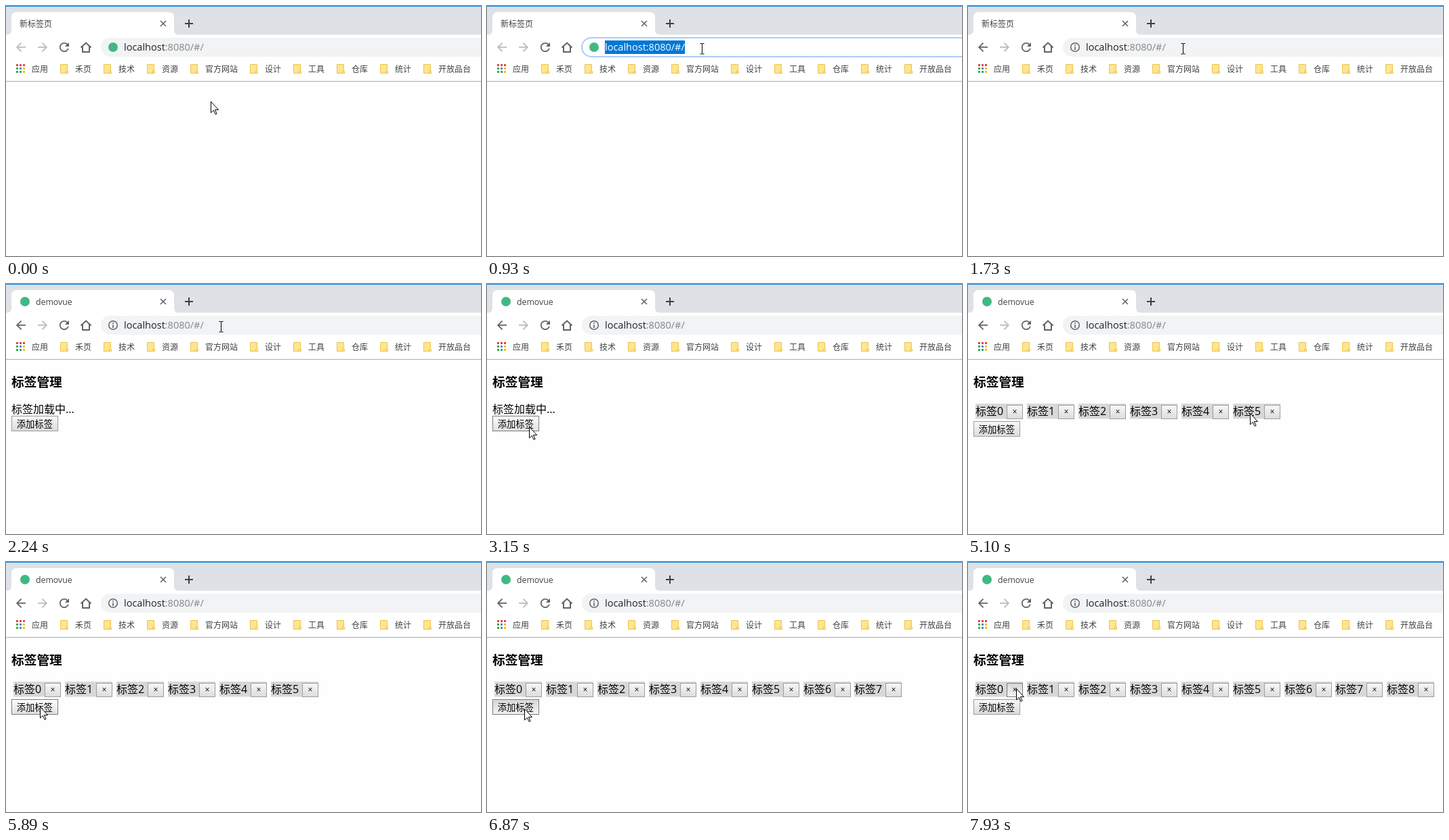
Write an HTML page that moves like this. It is 701 by 370 pixels and loops after 8000 ms.

```html
<!DOCTYPE html>
<html lang="zh-CN">
<head>
<meta charset="utf-8">
<title>demovue</title>
<style>
  html, body { margin: 0; width: 100%; height: 100%; overflow: hidden; background: #fefefe; }
  svg { display: block; }
  text { font-family: "Noto Sans CJK SC", "Noto Sans CJK", sans-serif; fill: #000; white-space: pre; }
  .ui { font-size: 12px; fill: #3c4043; }
  .latin { font-family: "Open Sans", "Noto Sans", sans-serif; }
  .url { font-size: 14.5px; fill: #202124; }
  .icon { fill: #5f6368; }
  .line { fill: none; stroke: #5f6368; stroke-width: 2; }
</style>
</head>
<body>
<svg id="stage" width="701" height="370" viewBox="0 0 701 370">
  <defs>
    <linearGradient id="face" x2="0" y2="1">
      <stop offset=".1" stop-color="#f5f5f5"/><stop offset="1" stop-color="#dcdcdc"/>
    </linearGradient>
    <linearGradient id="hover" x2="0" y2="1">
      <stop offset=".1" stop-color="#fafafa"/><stop offset="1" stop-color="#e0e0e0"/>
    </linearGradient>
    <linearGradient id="down" x2="0" y2="1">
      <stop offset="0" stop-color="#d6d6d6"/><stop offset="1" stop-color="#f4f4f4"/>
    </linearGradient>
  </defs>

  <rect width="701" height="370" fill="#fefefe"/>
  <rect width="701" height="43" fill="#dee1e6"/>
  <rect width="701" height="1" fill="#1883d7"/>
  <path d="M0 43q8 0 8-8V17q0-8 8-8H240q8 0 8 8V35q0 8 8 8Z" fill="#fff"/>
  <rect y="42.5" width="701" height="69" fill="#fff"/>
  <rect y="111" width="701" height="1" fill="#aeaeae"/>
  <path d="M228 22l8 8m0-8l-8 8" class="line" style="stroke-width:1.6"/>
  <path d="M264 26h12m-6-6v12" class="line" style="stroke:#3c4043"/>

  <path id="back" class="icon" transform="translate(11.4 50.4) scale(.88)" d="M20 11H7.83l5.59-5.59L12 4l-8 8 8 8 1.41-1.41L7.83 13H20z"/>
  <path class="icon" style="fill:#b9bbbe" transform="translate(64.6 50.4) scale(-.88 .88)" d="M20 11H7.83l5.59-5.59L12 4l-8 8 8 8 1.41-1.41L7.83 13H20z"/>
  <path class="icon" transform="translate(75.4 50.4) scale(.88)" d="M17.65 6.35C16.2 4.9 14.21 4 12 4c-4.42 0-7.99 3.58-7.99 8s3.57 8 7.99 8c3.73 0 6.84-2.55 7.73-6h-2.08c-.82 2.33-3.04 4-5.65 4-3.31 0-6-2.69-6-6s2.69-6 6-6c1.66 0 3.14.69 4.22 1.78L13 11h7V4z"/>
  <path class="line" d="M110.5 61.5L118 54.5l7.500 7M113 60v8h10v-8"/>

  <rect id="omni" rx="14"/>
  <circle id="siteDot" cx="158" cy="61" r="7" fill="#41b883"/>
  <g id="info">
    <circle cx="158" cy="61" r="6.300" class="line" style="stroke-width:1.500"/>
    <path d="M158 57v1.700m0 1.500v4.800" class="line" style="stroke-width:1.600"/>
  </g>
  <rect id="mark" x="174" y="51" width="118" height="20" fill="#0078d7"/>
  <text id="url" class="url latin" x="174" y="66">localhost<tspan id="port">:8080/#/</tspan></text>

  <circle id="tabDot" cx="28" cy="26" r="7" fill="#41b883"/>
  <text id="newTab" class="ui" x="20" y="30.500">新标签页</text>
  <text id="title" class="ui latin" x="44" y="31" style="font-size:12.300px">demovue</text>
  <g id="bookmarks"></g>

  <g id="page">
    <text x="8" y="151.500" font-size="18.720" font-weight="700">标签管理</text>
    <text id="loading" x="8" y="191" font-size="16">标签加载中<tspan class="latin">...</tspan></text>
    <g id="tags"></g>
    <g id="add">
      <rect x="8.500" y=".5" width="68" height="22"/>
      <text x="15.700" y="17" font-size="13.330">添加标签</text>
    </g>
  </g>

  <g id="cursor">
    <path id="arrow" d="M.5 .5V17l3.800-3.600 2.800 6 2-1-2.700-5.800h5.200Z" fill="#fff" stroke="#000" stroke-linejoin="round"/>
    <path id="beam" d="M-3 -7.500h2.500l.5 .5 .5-.5h2.500M0-7V7.500M-3 8h2.500l.5-.5 .5 .5h2.500" fill="none" stroke="#000"/>
  </g>
</svg>
<script>
const LOOP = 8000;
const NS = "http://www.w3.org/2000/svg";
const $ = id => document.getElementById(id);

function add(parent, name, attrs, text) {
  const node = document.createElementNS(NS, name);
  for (const key in attrs) node.setAttribute(key, attrs[key]);
  if (text) node.textContent = text;
  parent.appendChild(node);
  return node;
}
function set(node, attrs) {
  for (const key in attrs) node.setAttribute(key, attrs[key]);
}
const show = (id, on) => $(id).style.display = on ? "" : "none";

// Bookmark bar
const dots = ["#ea4335", "#ea4335", "#ea4335", "#34a853", "#4285f4", "#fbbc05", "#34a853", "#34a853", "#fbbc05"];
dots.forEach((fill, i) => add($("bookmarks"), "rect", {
  x: 15 + i % 3 * 5, y: 86 + Math.floor(i / 3) * 5, width: 3, height: 3, fill
}));
let left = 38;
["应用", "禾页", "技术", "资源", "官方网站", "设计", "工具", "仓库", "统计", "开放品台"].forEach((name, i) => {
  if (i) {
    add($("bookmarks"), "path", {
      d: `M${left - 21.5} 86.500h10v9l1 1v3h-11Z`, fill: "#ffe592", stroke: "#e9c548"
    });
    add($("bookmarks"), "path", { d: `M${left - 13.5} 99v-3h2`, fill: "none", stroke: "#e9c548" });
  }
  add($("bookmarks"), "text", { class: "ui", x: left, y: 98 }, name);
  left += name.length * 12 + 40;
});

// Tags with their close buttons
const tags = Array.from({ length: 9 }, (_, i) => {
  const x = Math.round(11 + i * 75.92);
  const group = add($("tags"), "g", {});
  add(group, "rect", { x, y: 177, width: 70, height: 22.5, fill: "#d8d8d8" });
  const label = add(group, "text", { x, y: 194, "font-size": 16 }, "标签");
  add(label, "tspan", { class: "latin" }, String(i));
  const face = add(group, "rect", { x: x + 46.5, y: 179.5, width: 23, height: 20 });
  add(group, "text", {
    x: x + 58, y: 193, "font-size": 12, "text-anchor": "middle",
    style: "font-family:'Liberation Sans',sans-serif;fill:#123"
  }, "×");
  return { x, group, face };
});

// Pointer stops: time, x, y
const path = [
  [0, 302, 141], [90, 302, 141], [500, 300, 68], [650, 300, 68], [930, 317, 63],
  [2700, 317, 63], [3150, 62, 211], [4110, 62, 211], [4200, 77, 195],
  [4690, 77, 195], [5190, 447, 191], [5440, 447, 191], [5660, 220, 224],
  [5870, 50, 214], [6040, 50, 214], [6240, 52, 220], [6330, 52, 220],
  [6600, 55, 217], [7520, 55, 217], [7750, 71, 187], [LOOP, 71, 187]
];
const presses = [[6070, 6160], [6400, 6500], [6790, 6930]];
const added = presses.map(p => p[1]);

function pointer(t) {
  const i = Math.max(1, path.findIndex(stop => stop[0] > t));
  const [t0, x0, y0] = path[i - 1], [t1, x1, y1] = path[i];
  const p = (t - t0) / (t1 - t0), e = p * p * (3 - 2 * p);
  return [Math.round(x0 + (x1 - x0) * e), Math.round(y0 + (y1 - y0) * e)];
}

function paint(face, over, down) {
  set(face, {
    fill: `url(#${down ? "down" : over ? "hover" : "face"})`,
    stroke: down || over ? "#7c7c7c" : "#9c9c9c"
  });
}

function render(t) {
  const [x, y] = pointer(t);
  const focus = t >= 650 && t < 1640;
  const marked = t >= 740 && t < 1110;
  const visited = t >= 1640;
  const titled = t >= 1860;
  const loaded = t >= 4110;
  const inside = (l, top, w, h) => x >= l && x < l + w && y >= top && y < top + h;

  set($("omni"), focus
    ? { x: 140, y: 47, width: 600, height: 28, fill: "#fff", stroke: "#aecbfa", "stroke-width": 2 }
    : { x: 140, y: 47, width: 600, height: 28, fill: "#f1f3f4", stroke: "none" });
  $("back").style.fill = visited ? "#5f6368" : "#b9bbbe";
  show("siteDot", !visited);
  show("info", visited);
  show("mark", marked);
  $("url").style.fill = marked ? "#fff" : "#202124";
  $("port").style.fill = marked ? "#fff" : focus ? "#202124" : "#80868b";
  show("newTab", !titled);
  show("tabDot", titled);
  show("title", titled);

  show("page", t >= 2000);
  show("loading", !loaded);
  const count = loaded ? 6 + added.filter(a => t >= a).length : 0;
  tags.forEach((tag, i) => {
    tag.group.style.display = i < count ? "" : "none";
    paint(tag.face, inside(tag.x + 46, 179, 24, 21), i === 0 && t >= 7930);
  });
  const top = loaded ? 203 : 195;
  set($("add"), { transform: `translate(0 ${top})` });
  paint($("add").firstElementChild, inside(8, top, 69, 23), presses.some(p => t >= p[0] && t < p[1]));

  const overUrl = y < 77;
  show("arrow", !overUrl);
  show("beam", overUrl);
  set($("cursor"), { transform: `translate(${x + (overUrl ? .5 : 0)} ${y})` });
}

const start = performance.now();
function tick() {
  render((performance.now() - start) % LOOP);
  requestAnimationFrame(tick);
}
render(0);
requestAnimationFrame(tick);
</script>
</body>
</html>
```
